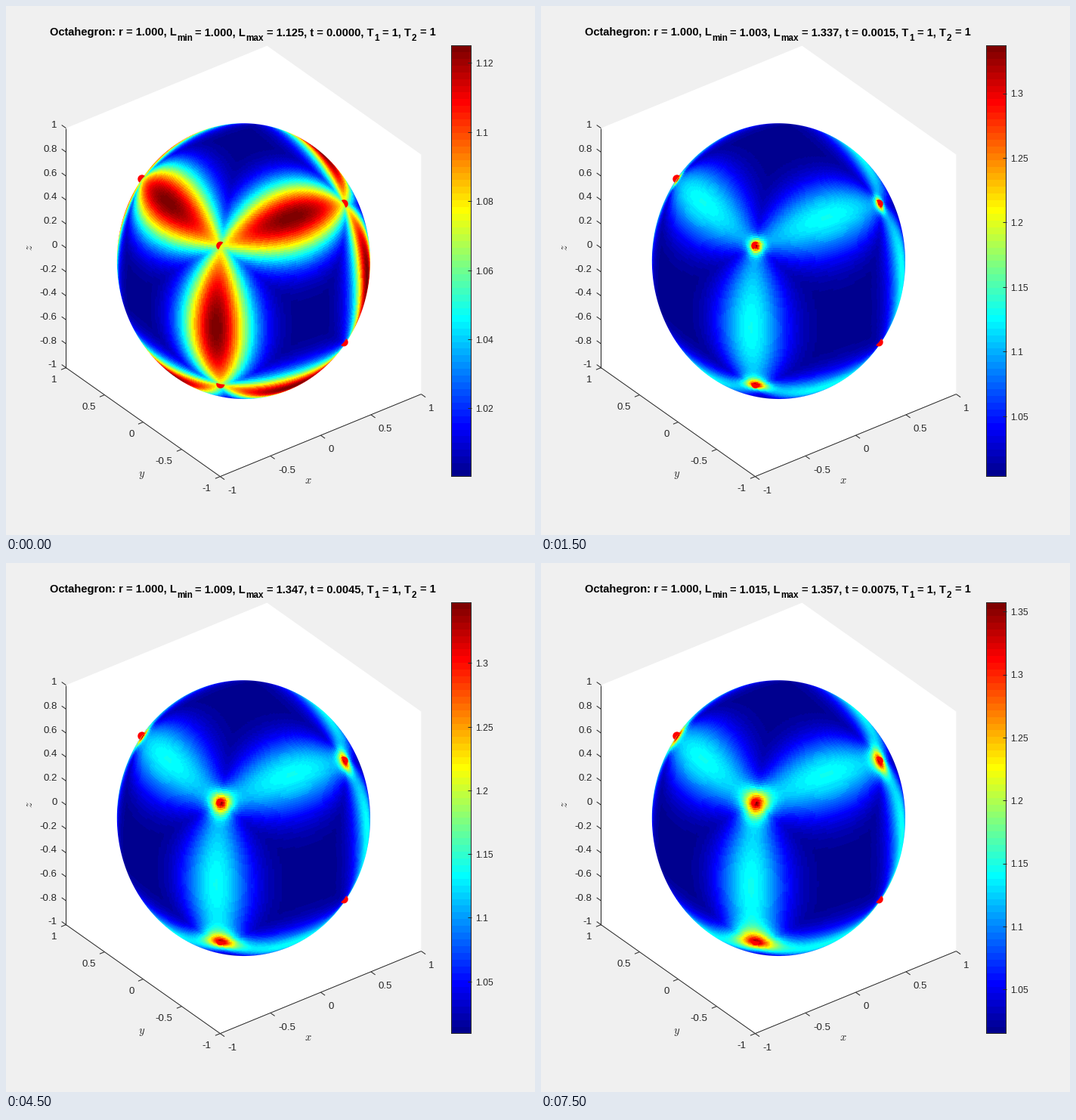
A matplotlib script that plays this animation: 700x700 px, repeating every 8 s.

```python
import itertools
import numpy as np
import matplotlib.pyplot as plt
from matplotlib.animation import FuncAnimation
from matplotlib.colors import ListedColormap
from matplotlib.patches import Polygon, Rectangle, Wedge

plt.rcParams["font.family"] = "Liberation Sans"
plt.rcParams["mathtext.fontset"] = "cm"

SIZE, DPI, FRAMES, INTERVAL = 700, 100, 16, 500
INK = "#262626"
CENTER = np.array([314.4, 337.6])
PROJ = np.array([[133, -102, 0], [-54.5, -72, -158.5]])
VIEW = -np.cross(PROJ[0], PROJ[1])
VIEW = VIEW / np.linalg.norm(VIEW) * np.sign(VIEW[2])
BAR_X, BAR_W, BAR_TOP, BAR_H = 589.5, 26, 52.5, 570


def project(p):
    return CENTER + PROJ @ np.asarray(p, float)


def px(size):
    return size * 72 / DPI


def jet64():
    x = np.arange(1, 65) / 64
    up, down = (-1.5, -0.5, 0.5), (4.5, 3.5, 2.5)
    return ListedColormap(np.column_stack(
        [np.clip(np.minimum(4 * x + a, b - 4 * x), 0, 1) for a, b in zip(up, down)]))


JET = jet64()

# Cube vertices on the unit sphere, turned about z
VERTS = [np.array([np.cos(a) * np.sqrt(2 / 3), np.sin(a) * np.sqrt(2 / 3), z / np.sqrt(3)])
         for a in np.radians(40 + 90 * np.arange(4)) for z in (1, -1)]
HALF_EDGE = np.arccos(1 / 3) / 2

# Sphere points behind every pixel of the ball
X0, X1, Y0, Y1 = 144, 486, 152, 524
gx, gy = np.meshgrid(np.arange(X0, X1) + 0.5, np.arange(Y0, Y1) + 0.5)
flat = np.stack([gx - CENTER[0], gy - CENTER[1]], -1) @ np.linalg.pinv(PROJ).T
rho = np.linalg.norm(flat, axis=-1)
flat /= np.maximum(rho, 1)[..., None]
ball = flat + np.sqrt(np.clip(1 - np.minimum(rho, 1) ** 2, 0, 1))[..., None] * VIEW
alpha = np.clip((1 - rho) * 172 + 0.5, 0, 1)

# Snap to a fine longitude / latitude mesh for flat facets
STEP = np.radians(0.9)
lon = (np.floor(np.arctan2(ball[..., 1], ball[..., 0]) / STEP) + 0.5) * STEP
lat = (np.floor(np.arcsin(np.clip(ball[..., 2], -1, 1)) / STEP) + 0.5) * STEP
facet = np.stack([np.cos(lat) * np.cos(lon), np.cos(lat) * np.sin(lon), np.sin(lat)], -1)

dist = [np.arccos(np.clip(facet @ v, -1, 1)) for v in VERTS]
nearest = np.min(dist, axis=0)
# Heat spreads wider around the lower vertices
spread_scale = np.where(lat < 0, 2.8, 1)


def petals():
    """Lens-shaped ridges along the twelve cube edges, 0 to 1."""
    total = 0
    for i, j in itertools.combinations(range(8), 2):
        if abs(VERTS[i] @ VERTS[j] - 1 / 3) < 0.01:
            excess = dist[i] + dist[j] - 2 * HALF_EDGE
            along = np.minimum(np.abs(dist[i] - dist[j]) / (2 * HALF_EDGE), 1) ** 2
            width = 0.111 * (1 - 0.37 * along)
            ridge = (1 - 0.45 * along) * np.exp(-excess / width)
            total = total + ridge ** 6
    return np.minimum(total ** (1 / 6), 1)


START = 1 + 0.125 * petals()


def limits(n):
    low = 1.0003 + 0.00098 * n
    high = 1.33135 + 0.0019 * n - 0.0000125 * n * n if n else 1.125
    return low, high


def field(n):
    values = START + 0.001 * n * START ** 2
    if n:
        reach = np.sqrt(spread_scale * (0.0014 + 0.0005 * (n - 1)))
        values = values + (limits(n)[1] - values) * np.exp(-(nearest / reach) ** 1.4)
    return values


def ball_image(n):
    low, high = limits(n)
    rgba = JET(np.clip((field(n) - low) / (high - low), 0, 0.9999))
    rgba[..., 3] = alpha
    return rgba


fig = plt.figure(figsize=(SIZE / DPI, SIZE / DPI), dpi=DPI, facecolor="#f0f0f0")
ax = fig.add_axes([0, 0, 1, 1])
ax.axis("off")


def label(x, y, s, size=13.3, ha="center", **kw):
    return ax.text(x, y + 0.36 * size, s, fontsize=px(size), ha=ha, va="baseline",
                   color=INK, **kw)


def line(p, q, width=0.72):
    return ax.plot([p[0], q[0]], [p[1], q[1]], color=INK, lw=width,
                   solid_capstyle="butt", zorder=2)[0]


def axis(start, end, step, out, shift, ha="center"):
    """Edge of the box from -1 to 1 with ticks pointing along `out`."""
    start, end = project(start), project(end)
    line(start, end)
    out = PROJ @ np.array(out, float)
    out *= 7 / np.linalg.norm(out)
    for v in np.arange(-1, 1.01, step):
        p = start + (end - start) * (v + 1) / 2
        line(p, p + out)
        label(*(p + shift), f"{round(v, 1) + 0:g}", ha=ha)


outline = [(-1, 1, 1), (1, 1, 1), (1, -1, 1), (1, -1, -1), (-1, -1, -1), (-1, 1, -1)]
ax.add_patch(Polygon([project(p) for p in outline], fc="white", ec="none", zorder=1))
axis((-1, 1, -1), (-1, 1, 1), 0.2, (0, 1, 0), (-12, -5), "right")
axis((-1, -1, -1), (-1, 1, -1), 0.5, (-1, 0, 0), (-12, 14.5), "right")
axis((-1, -1, -1), (1, -1, -1), 0.5, (0, -1, 0), (10, 17.5), "left")
for x, y, s, turn in ((400, 628, "$x$", 0), (180, 621, "$y$", 0), (31, 320, "$z$", 90)):
    ax.text(x, y, s, fontsize=px(14.5), color=INK, ha="center", va="center", rotation=turn)

ball_art = ax.imshow(ball_image(0), extent=(X0, X1, Y1, Y0), interpolation="nearest", zorder=3)

# Markers are half sunk into the ball
for v in VERTS:
    if v @ VIEW > -0.2:
        c = project(v) + (-0.9, -0.7)
        dx, dy = c - CENTER
        facing = np.degrees(np.arctan2(dy, dx))
        ax.add_patch(Wedge(c, 5.6, facing - 95, facing + 95, fc="red", ec="none", zorder=4))

ax.imshow(np.arange(64)[::-1, None], cmap=JET, aspect="auto", interpolation="nearest",
          extent=(BAR_X - 0.5, BAR_X + BAR_W + 0.5, BAR_TOP + BAR_H + 0.5, BAR_TOP - 0.5),
          zorder=2)
ax.add_patch(Rectangle((BAR_X, BAR_TOP), BAR_W, BAR_H, fill=False, ec=INK, lw=0.72,
                       snap=False, zorder=3))
bar_ticks = [(line((0, 0), (0, 0)), label(621, 0, "", 12.2, "left")) for _ in range(8)]
for tick, _ in bar_ticks:
    tick.set_zorder(4)


def title_part(x, s="", sub=False):
    return ax.text(x, 46 if sub else 39, s, fontsize=px(11.8 if sub else 14.67),
                   weight="bold", color="black", va="baseline")


title_part(57.5, "Octahegron: r = 1.000, L")
title_part(226, "min", True)
low_text = title_part(250.5)
title_part(317, "max", True)
high_text = title_part(345)
title_part(487.5, "1", True)
title_part(498, "= 1, T")
title_part(536.5, "2", True)
title_part(547.5, "= 1")

ax.set_aspect("auto")
ax.set_xlim(0, SIZE)
ax.set_ylim(SIZE, 0)


def update(n):
    low, high = limits(n)
    ball_art.set_data(ball_image(n))
    low_text.set_text(f"= {low:.3f}, L")
    high_text.set_text(f"= {high:.3f}, t = {0.0005 * n:.4f}, T")
    step = 0.05 if n else 0.02
    values = np.arange(np.ceil(low / step), np.floor(high / step) + 1) * step
    for i, (tick, text) in enumerate(bar_ticks):
        shown = i < len(values)
        tick.set_visible(shown)
        text.set_visible(shown)
        if shown:
            y = BAR_TOP + BAR_H * (high - values[i]) / (high - low)
            tick.set_data([BAR_X + BAR_W - 5, BAR_X + BAR_W], [y, y])
            text.set_text(f"{values[i]:.4g}")
            text.set_y(y + 0.36 * 12.2 + 0.5)
    return []


anim = FuncAnimation(fig, update, frames=FRAMES, interval=INTERVAL, repeat=True)
plt.show()
```
